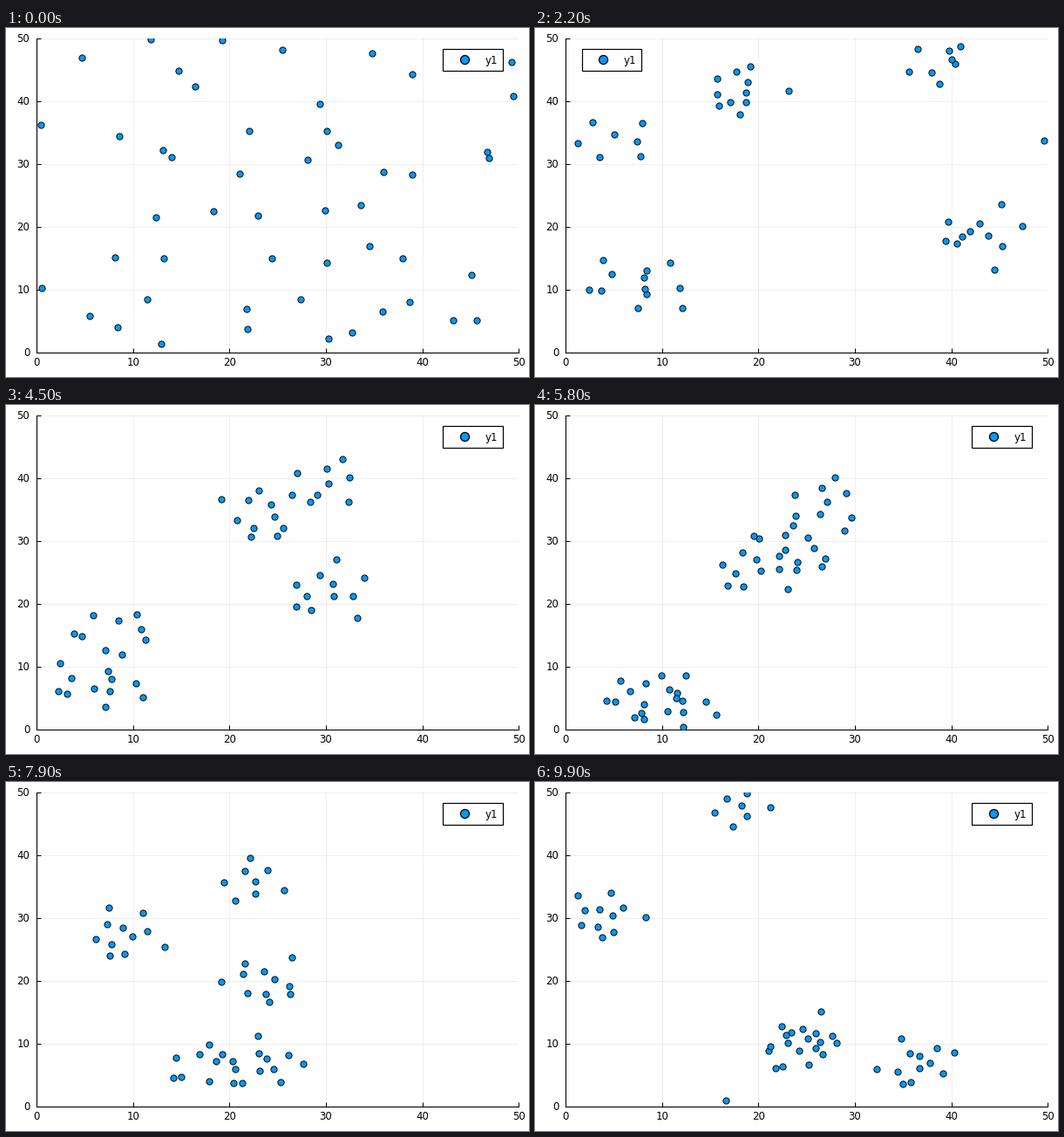
A matplotlib script that plays this animation: 600 by 400 pixels, repeating every 10000 ms.

```python
import numpy as np
import matplotlib.pyplot as plt
from matplotlib.animation import FuncAnimation
from matplotlib.patches import Rectangle

W, H, DPI = 600, 400, 100
FRAMES, STEP = 100, 100
SIZE = 50
BLUE = "#009afa"
PT = 72 / DPI
FONT = dict(family="DejaVu Sans", size=11.7 * PT, color="black")

# Each flock: number of birds and where its centre passes at the later key times
KEYS = np.array([0, 12, 32, 58, 79, 99])
FLOCKS = [
    (8, [(42, 47), (34, 43), (27, 36.5), (22.5, 36), (18, 48)]),
    (12, [(10.7, 10.2), (5, 11.3), (10.8, 3.8), (23, 6.5), (36.3, 6.8)]),
    (8, [(3, 38), (8.4, 28), (8, 6), (17, 7), (23.5, 9)]),
    (11, [(18, 41), (21.5, 38.5), (24.5, 29), (23.5, 20), (25, 11)]),
    (11, [(43, 18), (39.7, 18.5), (19.5, 26), (9, 27.5), (3.9, 30.5)]),
]
rng = np.random.default_rng(4)


def angle(p):
    return np.arctan2(p[:, 1], p[:, 0])


def scatter_start(count):
    """Random places, one per cell of a coarse grid so they spread evenly."""
    cols = int(np.ceil(np.sqrt(count)))
    cells = np.stack(np.divmod(rng.permutation(cols**2)[:count], cols), axis=1)
    return (cells + rng.uniform(0, 1, (count, 2))) * SIZE / cols


def flock_poses(start, path):
    """Key poses of one flock: scattered start, then a loose disc that tightens."""
    k = np.arange(len(start))
    turn = 2.4 * k + rng.uniform(0, 2 * np.pi)
    disc = np.sqrt(k + .5)[:, None] * np.c_[np.cos(turn), np.sin(turn)]
    disc += rng.normal(0, .35, disc.shape)
    # birds keep their side of the flock
    slots = np.empty_like(disc)
    slots[np.argsort(angle(start - start.mean(0)))] = disc[np.argsort(angle(disc))]
    poses = [start]
    for i, centre in enumerate(path):
        c, s = np.cos(.35 * i), np.sin(.35 * i)
        spread = 1.65 - .1 * i
        poses.append(np.array(centre) + spread * slots @ np.array([[c, s], [-s, c]]))
    return np.array(poses)


def build_poses():
    free = scatter_start(sum(n for n, _ in FLOCKS))
    flocks = []
    for n, path in FLOCKS:
        # each flock gathers the nearest birds still free
        near = np.argsort(np.hypot(*(free - path[0]).T))
        flocks.append(flock_poses(free[near[:n]], path))
        free = free[near[n:]]
    return np.concatenate(flocks, axis=1)


POSES = build_poses()
SPEED = np.gradient(POSES, KEYS, axis=0)


def positions(n):
    """Hermite blend between key poses, wrapped round the edges."""
    i = min(np.searchsorted(KEYS, n, side="right") - 1, len(KEYS) - 2)
    d = KEYS[i + 1] - KEYS[i]
    u = (n - KEYS[i]) / d
    p = ((2 * u**3 - 3 * u**2 + 1) * POSES[i]
         + (u**3 - 2 * u**2 + u) * d * SPEED[i]
         + (3 * u**2 - 2 * u**3) * POSES[i + 1]
         + (u**3 - u**2) * d * SPEED[i + 1])
    return p % SIZE


def legend_corner(n):
    if n < 6 or n >= 38:
        return 501.3, 23.6
    return (53.6, 333.6) if n < 22 else (53.6, 23.6)


fig = plt.figure(figsize=(W / DPI, H / DPI), dpi=DPI, facecolor="white")

L, R, T, B = 35.2, 588.2, 11.7, 371.7
ax = fig.add_axes([L / W, 1 - B / H, (R - L) / W, (B - T) / H])
ax.set(xlim=(0, SIZE), ylim=(0, SIZE))
ticks = range(0, SIZE + 1, 10)
ax.set_xticks(ticks, [""] * len(ticks))
ax.set_yticks(ticks, [""] * len(ticks))
ax.tick_params(direction="in", length=5 * PT, width=PT)
ax.grid(color="black", alpha=.08, linewidth=.8 * PT)
ax.set_axisbelow(True)
for side, spine in ax.spines.items():
    spine.set_visible(side in ("left", "bottom"))
    spine.set_linewidth(1.1 * PT)
dots = ax.scatter(*POSES[0].T, s=(7.2 * PT)**2, c=BLUE, edgecolors="black",
                  linewidths=.95 * PT, zorder=3)

# Pixel overlay for tick labels and legend
top = fig.add_axes([0, 0, 1, 1], zorder=2)
top.set(xlim=(0, W), ylim=(H, 0))
top.axis("off")
for v in ticks:
    top.text(L + (R - L) * v / SIZE, 387.3, str(v), ha="center", va="baseline", **FONT)
    top.text(27.2, B - (B - T) * v / SIZE + 4.4, str(v), ha="right", va="baseline", **FONT)

box = top.add_patch(Rectangle((0, 0), 68.3, 25.6, facecolor="white",
                              edgecolor="black", linewidth=1.2 * PT))
key, = top.plot([0], [0], "o", ms=10 * PT, mfc=BLUE, mec="black", mew=1.3 * PT)
label = top.text(0, 0, "y1", ha="left", va="baseline", **FONT)


def draw(n):
    dots.set_offsets(positions(n))
    x, y = legend_corner(n)
    box.set_xy((x, y))
    key.set_data([x + 24.2], [y + 12.8])
    label.set_position((x + 48.3, y + 17.3))
    return dots, box, key, label


anim = FuncAnimation(fig, draw, frames=FRAMES, interval=STEP, repeat=True,
                     repeat_delay=0)
plt.show()
```
